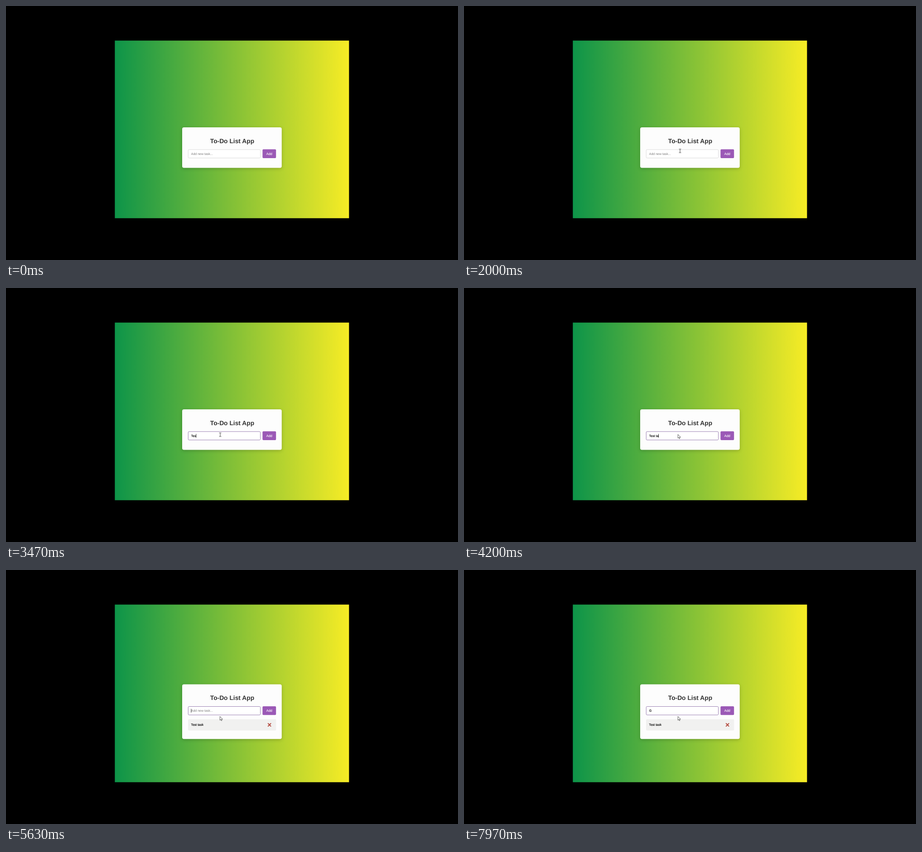
Animation, 998 px wide and 561 px high, one loop 8 s. Source, as an HTML page:

```html
<!DOCTYPE html>
<html lang="en">
<head>
<meta charset="utf-8">
<title>To-Do List</title>
<style>
  html, body { margin: 0; width: 100%; height: 100%; overflow: hidden; background: #000; }
  svg { display: block; width: 998px; height: 561px; font: 7px "Liberation Sans", Arial, sans-serif; }
  text { white-space: pre; text-rendering: geometricPrecision; }
  .title { font-size: 13.8px; font-weight: bold; }
  .mid { text-anchor: middle; }
  .task { fill: #000; stroke: #000; stroke-width: .15; }
  .label { font-size: 7.3px; fill: #fff; stroke: #fff; stroke-width: .12; }
  #card { filter: drop-shadow(0 2px 3.5px rgba(0, 0, 0, .2)); }
</style>
</head>
<body>
<svg viewBox="0 0 998 561">
  <defs>
    <linearGradient id="meadow">
      <stop offset="0" stop-color="#0d9449"/>
      <stop offset="1" stop-color="#f7ec25"/>
    </linearGradient>
    <clipPath id="page"><rect x="240" y="76" width="518" height="393"/></clipPath>
  </defs>
  <g clip-path="url(#page)">
    <rect x="240.3" y="76.4" width="517.1" height="392.3" fill="url(#meadow)"/>
    <rect id="card" x="389" width="219.8" rx="4" fill="#fdfdfd"/>
    <g id="form">
      <text class="title mid" x="499.4" y="302.7" fill="#333">To-Do List App</text>
      <rect id="field" x="402.3" y="317.1" width="159.3" height="18.6" rx="2" fill="#fff"/>
      <text id="hint" x="408.8" y="329" fill="#7b7b7b">Add new task...</text>
      <text id="typed" class="task" x="408.8" y="329"></text>
      <rect id="caret" y="322.2" width=".8" height="8.4" fill="#111"/>
      <rect x="566.4" y="316.6" width="29.8" height="19.3" rx="2" fill="#9b59b6"/>
      <text class="label mid" x="581.3" y="329">Add</text>
    </g>
    <g id="item">
      <rect x="402" y="329.6" width="194.3" height="25" rx="2" fill="#f1f1f0"/>
      <text class="task" x="408.4" y="343.6">Test task</text>
      <path d="M578.8 339.1l5.8 5.8m0-5.8l-5.8 5.8" stroke="#b8564c" stroke-width="2.1" stroke-linecap="round"/>
    </g>
    <g id="pointer">
      <path id="beam" d="M-2.4-4H-.6L0-3.5.6-4H2.4M0-3.5V3.5M-2.4 4H-.6L0 3.5.6 4H2.4" fill="none" stroke="#333" stroke-width=".9"/>
      <path id="arrow" d="M0 0V8.4L1.9 6.6 3.2 9.6 4.6 9 3.4 6.1H5.9Z" transform="translate(-.7 -.6)" fill="#fff" stroke="#222" stroke-width=".7" stroke-linejoin="round"/>
    </g>
  </g>
</svg>
<script>
  const LOOP = 8000, FOCUS = 2400, ENTER = 5400, BLINK = 500;
  const el = id => document.getElementById(id);
  const [card, form, field, hint, typed, caret, item, pointer, beam, arrow] =
    ["card", "form", "field", "hint", "typed", "caret", "item", "pointer", "beam", "arrow"].map(el);

  // [time, field content]; each entry restarts the caret blink
  const edits = [[FOCUS, ""], ...[3100, 3260, 3410, 3570, 3820, 3990, 4150, 4310, 4480]
    .map((t, i) => [t, "Test task".slice(0, i + 1)]), [ENTER, ""], [7400, "G"]];

  // [time, x, y]
  const path = [[1430, 752, 84], [1600, 640, 200], [1780, 530, 288], [1940, 477, 320],
    [2060, 477, 320], [2220, 473, 324]];

  const show = (node, on) => node.setAttribute("visibility", on ? "inherit" : "hidden");

  function pointerAt(t) {
    const i = path.findIndex(p => p[0] > t);
    if (i < 0) return path[path.length - 1].slice(1);
    const [a, b] = [path[Math.max(i - 1, 0)], path[i]];
    const k = Math.max(0, (t - a[0]) / (b[0] - a[0] || 1));
    return [a[1] + (b[1] - a[1]) * k, a[2] + (b[2] - a[2]) * k];
  }

  function render(t) {
    const added = t >= ENTER, focused = t >= FOCUS;
    card.setAttribute("y", added ? 252.4 : 268);
    card.setAttribute("height", added ? 120.8 : 89.6);
    form.setAttribute("transform", `translate(0 ${added ? -15.6 : 0})`);
    show(item, added);

    field.setAttribute("stroke", focused ? "#8f72ab" : "#cfcfcf");
    field.setAttribute("stroke-width", focused ? .9 : .7);

    const [since, text] = edits.filter(e => e[0] <= t).pop() || [t, ""];
    if (typed.textContent !== text) typed.textContent = text;
    show(hint, !text);
    show(caret, focused && (t - since) % (2 * BLINK) < BLINK);
    caret.setAttribute("x", 408.5 + (text ? typed.getComputedTextLength() : 0));

    const [x, y] = pointerAt(t);
    const overText = y > 316 && t < 4000;
    pointer.setAttribute("transform", `translate(${x} ${y})`);
    show(pointer, t >= path[0][0]);
    show(beam, overText);
    show(arrow, !overText);
  }

  function tick() {
    render(performance.now() % LOOP);
    requestAnimationFrame(tick);
  }
  tick();
</script>
</body>
</html>
```
